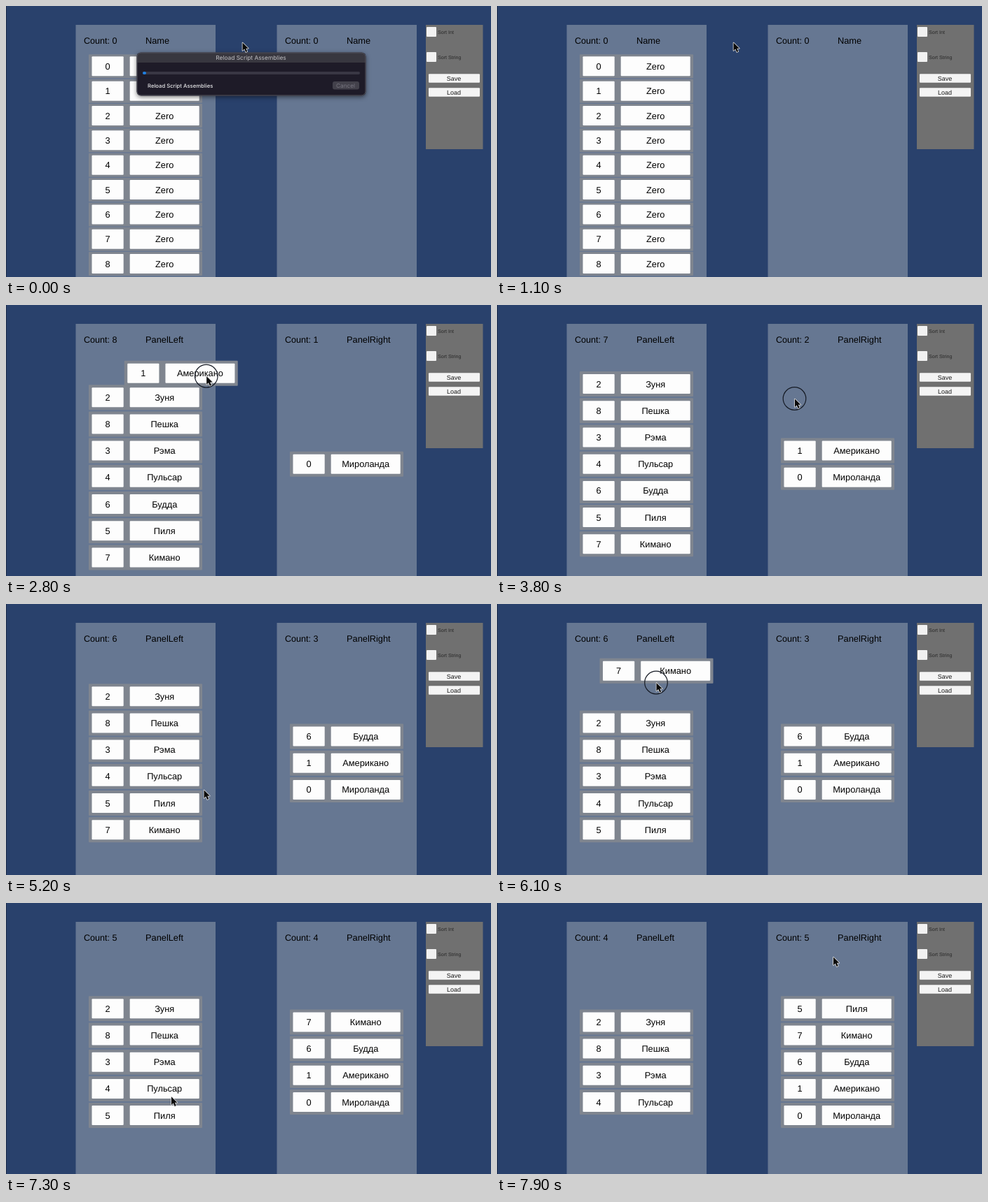
An HTML page with a canvas that plays this animation: 692x388 px, repeating every 8000 ms.

```html
<!DOCTYPE html>
<html lang="ru">
<head>
<meta charset="utf-8">
<title>Drag between panels</title>
<style>
html, body { margin: 0; width: 100%; height: 100%; overflow: hidden; background: #29416c; }
canvas { display: block; }
</style>
</head>
<body>
<canvas width="692" height="388"></canvas>
<script>
const ctx = document.querySelector('canvas').getContext('2d');
const LOOP = 8000, STEP = 100, LOADED = 1400, DIALOG_END = 800, PRESS_LEAD = 200;
const ROW_X = 118, SHIFT = 287, MID_X = 343, MID_Y = 227.7;
const SANS = '"Liberation Sans", Arial, sans-serif';
const UI = 'Inter, Roboto, sans-serif';

const NAMES = ['Мироланда', 'Американо', 'Зуня', 'Рэма', 'Пульсар', 'Пиля', 'Будда', 'Кимано', 'Пешка'];
const ORDER = [0, 1, 2, 8, 3, 4, 6, 5, 7];

// Pointer stops; a grabbed row is held until the next drop
const STOPS = [
  { t: 0, x: 337, y: 52 },
  { t: LOADED, x: 337, y: 52 },
  { t: 2000, x: 256, y: 86, grab: 0 },
  { t: 2400, x: 500, y: 110, drop: true },
  { t: 2700, x: 235, y: 98, grab: 1 },
  { t: 3100, x: 438, y: 113, drop: true },
  { t: 3800, x: 424.5, y: 134 },
  { t: 4000, x: 225, y: 280, grab: 6 },
  { t: 4800, x: 452, y: 156, drop: true },
  { t: 5200, x: 282, y: 266 },
  { t: 5800, x: 198.5, y: 340, grab: 7 },
  { t: 6000, x: 216, y: 84 },
  { t: 6100, x: 227, y: 112.5 },
  { t: 6800, x: 505, y: 100, drop: true },
  { t: 7300, x: 235.5, y: 277 },
  { t: 7600, x: 240, y: 300, grab: 5 },
  { t: 7800, x: 475, y: 80, drop: true },
  { t: LOOP, x: 484, y: 74 }
];

function pointer(t) {
  const i = STOPS.findIndex(s => s.t > t), a = STOPS[i - 1], b = STOPS[i];
  const k = (t - a.t) / (b.t - a.t);
  return { x: a.x + (b.x - a.x) * k, y: a.y + (b.y - a.y) * k };
}

function box(x, y, w, h, color, r = 0) {
  ctx.fillStyle = color;
  ctx.beginPath();
  ctx.roundRect(x, y, w, h, r);
  ctx.fill();
}

function text(s, x, y, size, color = '#000', align = 'left', family = SANS, weight = 400) {
  ctx.font = `${weight} ${size}px ${family}`;
  ctx.textRendering = 'geometricPrecision';
  ctx.fillStyle = color;
  ctx.textAlign = align;
  ctx.fillText(s, x, y);
}

const pitch = n => n > 8 ? 35.35 : 38.2;
const rowY = (i, n) => MID_Y + (i - (n - 1) / 2) * pitch(n);

function field(x, y, w, s) {
  box(x, y - 14, w, 28, '#fdfdfd', 1);
  text(s, x + w / 2, y + 4.5, 12.8, '#000', 'center');
}

function row(x, y, id, name, h = 36) {
  box(x, y - h / 2, 162, h, '#7f858f', 1);
  field(x + 4.5, y, 45.2, id);
  field(x + 58.7, y, 99, name);
}

function list(ids, x, loaded) {
  const n = ids.length;
  ids.forEach((id, i) => {
    if (id !== null) row(x, rowY(i, n), id, loaded ? NAMES[id] : 'Zero', n > 8 ? 34 : 36);
  });
}

function panel(x, count, name) {
  box(x, 27, 199.5, 361, '#667792');
  text('Count: ' + count, x + 11.5, 54, 12.6);
  text(name, x + 99.5, 54, 12.8);
}

function sidebar() {
  box(599, 27, 81.5, 178, '#707070');
  ['Sort Int', 'Sort String'].forEach((s, i) => {
    const y = 30 + i * 36;
    box(600, y, 14, 14, '#f1f1f1', 1);
    text(s, 616, y + 10, 7.1, '#282828');
  });
  ['Save', 'Load'].forEach((s, i) => {
    const y = 97.2 + i * 20;
    box(603, y, 73, 12.6, '#f4f4f4', 1);
    text(s, 639, y + 9.5, 9, '#1a1a1a', 'center');
  });
}

function dialog() {
  ctx.save();
  ctx.shadowColor = 'rgba(0,0,0,.5)';
  ctx.shadowBlur = 6;
  ctx.shadowOffsetY = 2;
  box(186.5, 66.5, 327, 62, '#1e1b28', 6);
  ctx.restore();
  box(187, 67, 326, 14, '#38373f', [6, 6, 0, 0]);
  ctx.strokeStyle = '#55555e';
  ctx.lineWidth = 1;
  ctx.beginPath();
  ctx.roundRect(187, 67, 326, 61, 6);
  ctx.stroke();
  text('Reload Script Assemblies', 349.5, 76.7, 8.4, '#c0c0c4', 'center', UI);
  box(195, 94, 310, 4, '#393744', 2);
  box(195, 94, 5, 4, '#1f7fe0', 2);
  text('Reload Script Assemblies', 202, 116.7, 7.7, '#e8e8ea', 'left', UI, 500);
  box(466, 108, 38, 11.5, '#43414b', 3);
  text('Cancel', 484.5, 116.7, 8.2, '#777580', 'center', UI);
}

function cursor({ x, y }, pressed) {
  if (pressed) {
    ctx.strokeStyle = '#151a24';
    ctx.lineWidth = 1.2;
    ctx.beginPath();
    ctx.arc(x, y, 16.3, 0, 7);
    ctx.stroke();
  }
  ctx.save();
  ctx.translate(x + 0.5, y + 0.5);
  ctx.lineJoin = 'round';
  ctx.lineWidth = 1.6;
  ctx.strokeStyle = '#e0e0e0';
  ctx.fillStyle = '#0a0a0a';
  const arrow = new Path2D('M0 0V11.5L2.7 9 4.7 13.5 6.7 12.6 4.8 8.3 8.3 8.2Z');
  ctx.stroke(arrow);
  ctx.fill(arrow);
  ctx.restore();
}

function draw(t) {
  const loaded = t >= LOADED, p = pointer(t);
  const left = loaded ? [...ORDER] : [...ORDER].sort(), right = [];
  let held = null;
  for (const s of STOPS.filter(s => s.t <= t)) {
    if (s.grab !== undefined) held = s;
    if (s.drop) {
      left.splice(left.indexOf(held.grab), 1);
      right.unshift(held.grab);
      held = null;
    }
  }
  const counts = loaded ? [left.length, right.length] : [0, 0];
  let heldX, heldY;
  if (held) {
    const i = left.indexOf(held.grab);
    heldX = ROW_X + p.x - held.x;
    heldY = rowY(i, left.length) + p.y - held.y;
    left.splice(i, 1);
    // An empty slot follows the held row
    const target = p.x < MID_X ? left : right, size = target.length + 1;
    const slot = Math.round((heldY - rowY(0, size)) / pitch(size));
    target.splice(Math.max(0, slot), 0, null);
  }

  box(0, 0, 692, 388, '#29416c');
  box(0, 0, 1, 388, '#1d2d4b');
  panel(99.5, counts[0], loaded ? 'PanelLeft' : 'Name');
  panel(386.5, counts[1], loaded ? 'PanelRight' : 'Name');
  sidebar();
  list(left, ROW_X, loaded);
  list(right, ROW_X + SHIFT, loaded);
  if (held) row(heldX, heldY, held.grab, NAMES[held.grab]);
  if (t < DIALOG_END) dialog();
  const pressing = STOPS.some(s => s.grab !== undefined && t < s.t && t >= s.t - PRESS_LEAD);
  cursor(p, held || pressing);
}

const start = performance.now();
function tick() {
  const t = (performance.now() - start) % LOOP;
  draw(Math.floor(t / STEP) * STEP);
  requestAnimationFrame(tick);
}
tick();
</script>
</body>
</html>
```
